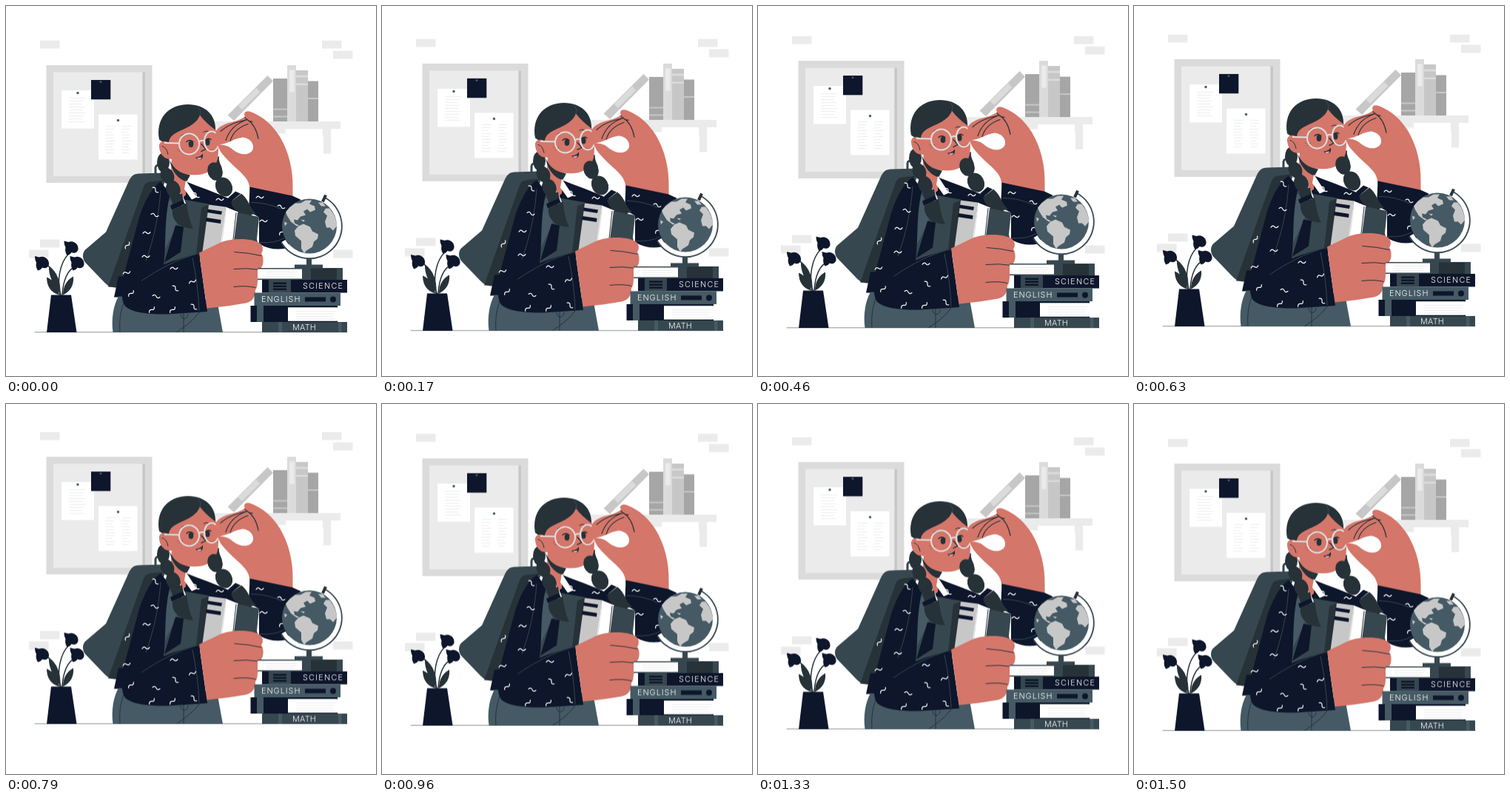
An HTML page that plays this animation: 500 by 500 pixels, repeating every 1540 ms.

```html
<!DOCTYPE html>
<html lang="en">
<head>
<meta charset="utf-8">
<title>Student with books</title>
<style>
html, body { margin: 0; width: 100%; height: 100%; overflow: hidden; background: #fff; }
svg { display: block; width: 100vw; height: 100vh; }
.navy { fill: #0d162b } .coal { fill: #263238 } .slate { fill: #37474f } .steel { fill: #455a64 }
.g1 { fill: #ebebeb } .g2 { fill: #dbdbdb } .g3 { fill: #c7c7c7 } .g4 { fill: #a6a6a6 }
.w { fill: #fff } .skin { fill: #d4766a }
.line { fill: none; stroke: #263238; stroke-width: 1; stroke-linecap: round; stroke-linejoin: round }
.soft { fill: none; stroke: #37474f; stroke-width: 1 }
.rule { fill: none; stroke: #e6e6e6; stroke-width: .7 }
.mark { fill: none; stroke: #fff; stroke-width: 1.2; stroke-linecap: round }
.rim { fill: none; stroke: #e0e0e0; stroke-width: 2 }
text { font: 300 10.8px Inter, sans-serif; fill: #fff }
</style>
</head>
<body>
<svg viewBox="0 0 500 500">
<g id="scene">
  <g id="bricks" class="g1"></g>

  <!-- notice board -->
  <rect class="g2" x="54.500" y="80.500" width="143" height="159"/>
  <rect class="g1" x="64" y="90" width="120.500" height="140.500"/>
  <rect class="g3" x="184.500" y="90" width="3.500" height="140.500"/>
  <rect class="w" x="75" y="114.500" width="44" height="51.500"/>
  <rect class="w" x="125" y="147" width="52.500" height="61"/>
  <rect class="navy" x="115" y="100.500" width="26.300" height="26.300"/>
  <path id="notes" class="rule"/>
  <g class="steel"><circle cx="97" cy="118" r="1.700"/><circle cx="151.500" cy="155" r="1.700"/><circle cx="128" cy="103" r="1.500"/></g>

  <!-- shelf -->
  <path class="g1" d="M281 156.500H452V166.500H439V200H429V177H428V166.500H378V173H362V166.500H281Z"/>
  <path class="g4" d="M361 98.500H380V156.500H361ZM408 102H422V156.500H408Z"/>
  <path class="g2" d="M380 80.500H392V156.500H380Z"/>
  <path class="g3" d="M392 87.500H408V156.500H392ZM361 139H380V141H361ZM361 149H380V151H361ZM408 124.500H422V126.500H408ZM353.500 94.500 361 102 308 155.500 299.500 148Z"/>
  <path class="g1" d="M383 87H389.500V117H383Z"/>
  <path class="g2" d="M392 94H408V97H392ZM392 105H408V107.500H392ZM338 111 343.500 116.500 319 140.500 313.500 135Z"/>

  <path class="line" style="stroke-width:.7" d="M39 441.500H461"/>

  <!-- plant -->
  <path class="line" style="stroke-width:1.500" d="M74 391C68 372 73 347 85 335M73 391C73 374 63 352 53 350M76 391C77 372 83 356 95 352"/>
  <path class="coal" d="M72 391C60 388 55 378 55 367C65 371 71 381 72 391ZM73 389C64 378 57 364 58 352C69 359 75 375 73 389ZM77 391C77 379 82 371 91 366C92 378 87 386 77 391Z"/>
  <g class="navy">
    <path id="bloom" d="M58 350C59 343 52 337 45 340L39 338.500C39 343 40 345 41 347C40 351 41 355 43 358C46 357 48 356 49 354C53 356 57 354 58 350Z"/>
    <use href="#bloom" transform="translate(39.500 -20.500)"/>
    <use href="#bloom" transform="translate(47.500 0)"/>
    <path d="M61 391H88L95.500 441.500H55Z"/>
  </g>

  <!-- backpack -->
  <path class="line" style="stroke-width:3;stroke:#37474f" d="M202 228V219Q203 214 210 216"/>
  <path class="slate" d="M212 226 180 227C172 227 169 231 166 237L135 306 107 330C103 334 103 342 107 347L133 374C138 379 142 381 149 381H166L214 240Z"/>
  <path class="coal" d="M212 236 195 238Q188 239 186 245L138 380 160 381Z"/>
  <path class="navy" d="M152 366H164V394H146Z"/>

  <!-- trousers -->
  <path class="steel" d="M152 393C145 405 142 424 144.500 441.500H293L286 403 262 395Z"/>
  <path class="line" d="M159 402C154 416 153 428 154 441M262 413C255 424 243 433 231 441M240 416V441M236 417C236 425 246 425 246 417"/>

  <!-- torso -->
  <path class="navy" d="M244 238C260 245 282 251 312 266L330 275 342 330 240 345 210 358 218 250Z"/>
  <path class="slate" d="M216 244 240 262 274 268 264 338 210 357Z"/>
  <path class="steel" d="M215 258 236 272 230 298 212 335Z"/>
  <path class="navy" d="M229 297 240 299 236 333 214 347Z"/>
  <path class="skin" d="M224 204 248 222 244 240 243 256 238 260C230 250 226 243 222 240Z"/>
  <path class="coal" d="M221 208C226 220 235 227 249 229L244 238C232 234 224 224 221 208Z"/>
  <path class="w" d="M227 244 239 257 244 270 239 275ZM243 236 258 259 251 262 241 248Z"/>
  <path class="navy" d="M209 238C197 246 186 266 179 290L160 361C156 382 155 398 161 406C169 415 196 417.500 218 417L272 413.500 261 334 226 345 213 350C217 320 213 290 222 254Z"/>
  <path class="soft" d="M183 372C205 357 230 343 260 335M252 341Q260 380 261 413M209 250C206 290 198 320 189 345"/>

  <!-- head -->
  <g class="coal">
    <ellipse cx="212.500" cy="212" rx="8.500" ry="13"/>
    <path d="M278 204H288C287 210 290 214 292 220L274 224Z"/>
  </g>
  <path class="skin" d="M219 166C218 192 221 206 231 219C238 227 248 230 261 228.500C274 227 283 220 286 207C288 194 287 178 283 166C276 149 262 140 240 150Z"/>
  <path class="coal" d="M207 181C202 153 219 133.500 246 133.500C269 133.500 284 148 283 168C274 161 267 155 262 148C257 162 240 166 228 173C221 177 219 184 220 190Z"/>
  <path class="line" style="stroke:#455a64;stroke-width:.7" d="M262 148Q265 142 259 137"/>
  <path class="skin" d="M225 189C217 180 206 182 207 191C208 202 215 209 225 207Z"/>
  <path class="line" d="M211 190Q217 191 219 201M237 176Q244 171 250 174M267 171Q271 168 275 171"/>
  <g class="coal"><ellipse cx="250" cy="187" rx="3.300" ry="4.500"/><ellipse cx="272.500" cy="184.500" rx="3" ry="4.500"/></g>
  <path class="line" style="stroke-width:1.400" d="M244 184Q248 180 253 184M269 182Q273 178 277 181M264 187 270 194 264 197"/>
  <path class="coal" d="M256 205Q262 205 266 200Q267 207 262 208Q258 208 256 205Z"/>
  <path d="M258 206Q262 205 264 205Q264 208 260 208Z" fill="#f0a0a8"/>
  <path class="line" style="stroke-width:.9;stroke:#7c2f2a;stroke-dasharray:.1 3" d="M232 194H240M234 197H240M273 195H280"/>
  <ellipse class="rim" cx="247.500" cy="187" rx="13.500" ry="14"/>
  <ellipse class="rim" cx="278" cy="183.500" rx="10" ry="13.500"/>
  <path class="rim" d="M214 185.500 234 186M261 184Q264 181 268 183"/>

  <!-- raised arm -->
  <path class="skin" fill-rule="evenodd" d="M284 169C287 164 295 160 303 158C311 156 319 153 323 150C320 144 325 141 332 144C347 150 360 161 370 177C382 197 388 221 387.500 246V261L329 250C331 234 316 225 303 212C294 203 289 197 287 191C284 184 282 176 284 169ZM288 188C297 188 301 190 307 195C317 203 331 203 334 193C335 185 329 179 320 178C309 179 302 186 288 188Z"/>
  <path class="line" style="stroke-width:1.200" d="M290 170C301 160 314 157 326 154C334 159 339 169 341 180M297 182C300 173 307 160 326 154M303 183C306 172 315 164 327 160M323 151Q326 156 333 157"/>
  <path class="navy" d="M329.500 245 387 257 398 262 392 310 378 328Q360 332 342 322V286L328 278Z"/>
  <path class="soft" d="M331 266Q352 266 372 275M343 320Q362 322 376 314"/>

  <g id="marks" class="mark"></g>

  <!-- braids -->
  <g class="coal">
    <ellipse cx="218" cy="230" rx="9" ry="11.500" transform="rotate(-25 218 230)"/>
    <ellipse cx="226" cy="248" rx="9.500" ry="12" transform="rotate(-20 226 248)"/>
    <path d="M222 257 238 254 241 268 226 272ZM225 276 244 267C246 280 248 292 253 301C238 302 223 292 225 276Z"/>
    <ellipse cx="282.500" cy="224" rx="10" ry="12.500" transform="rotate(-20 282.500 224)"/>
    <ellipse cx="294.500" cy="245" rx="11" ry="13.500" transform="rotate(-30 294.500 245)"/>
    <path d="M304 265 318 254C328 261 329 274 338 281C324 285 308 282 304 265Z"/>
  </g>
  <path class="navy" d="M222 270 238 263 242 268 224 276ZM300 260 310 251 317 254 304 265Z"/>

  <!-- carried books -->
  <path class="coal" d="M264 273 274 269 267 336 257 336Z"/>
  <path class="g3" d="M274 269 297 272 290 330 265 336Z"/>
  <path class="navy" d="M272.500 275 292 278 291 282.500 272 279.500ZM271 286.500 290.500 289.500 290 294.500 270 291.500Z"/>
  <path class="w" d="M297 272 314 279 308 325 289 330Z"/>
  <path class="soft" style="stroke:#dbdbdb" d="M297 278 291 325"/>
  <path class="slate" d="M313 279.500 342 285.500 338 325H307Z"/>
  <path class="line" d="M311 280 306 325"/>
  <path class="skin" d="M261 334 288 321C304 314 329 314 341 320C348 323 348 331 345 335C349 340 348 351 345 354C345 360 343 367 340 370C340 377 339 382 337 384C337 394 333 400 324 402C308 405 290 407 271.500 409Z"/>
  <path class="line" d="M309 333Q328 334 345 338M308 356Q325 354 343 357M308 380Q325 378 337 381"/>

  <!-- globe -->
  <path d="M430 263A40.300 40.300 0 1 1 375 318" fill="none" stroke="#fff" stroke-width="6"/>
  <path d="M432 260A43.900 43.900 0 1 1 372 320" fill="none" stroke="#37474f" stroke-width="1.800"/>
  <path d="M428 265 432 256" stroke="#263238" stroke-width="4" fill="none"/>
  <path class="slate" d="M406 341H413V350H428V355.500H390V350H406Z"/>
  <circle class="steel" cx="410" cy="298" r="37"/>
  <path class="g3" d="M383 273 391 267 398 267 405 263 413 263 410 268 417 271 418 276 411 279 407 275 402 278 405 283 398 285 394 290 389 289 390 294 396 297 393 298 385 292 380 284 378 279ZM395 298 402 295 411 299 414 305 422 309 421 315 416 319 414 326 406 331 403 335 399 328 399 318 391 311 390 304ZM437 274C443 280 447 290 447 298L442 304 438 300 433 300 431 292 434 284 429 279 432 274ZM422 266 428 266 432 271 426 271Z"/>
  <path class="g3" d="M398 289 404 290 402 292ZM376 292 380 294 377 298Z"/>

  <!-- book stack -->
  <path class="w" d="M340 355H400V370H340Z"/>
  <path class="slate" d="M340 354.500H455V370.500H340V369H400V356H340Z"/>
  <path class="coal" d="M412 355H447V370.500H412Z"/>
  <path class="navy" d="M346 370.500H461V388H346Z"/>
  <path class="slate" d="M355 370.500H385V388H355Z"/>
  <path class="navy" d="M361 374H379V376.500H361ZM361 378H379V380.500H361ZM361 382H379V384.500H361Z"/>
  <path class="steel" d="M335.500 388H452V405.500H335.500Z"/>
  <path class="navy" d="M404 394H432V400H404Z"/><circle class="navy" cx="442" cy="397" r="4"/>
  <path class="navy" d="M330.500 405.500H448V408H381V426H448V427.500H330.500Z"/>
  <path class="steel" d="M339 405.500H348V427.500H339Z"/>
  <path class="w" d="M381 408H447.500V426H381Z"/>
  <path class="slate" d="M346 427.500H461V441.500H346Z"/>
  <path class="steel" d="M368 427.500H373V441.500H368ZM449 427.500H453.500V441.500H449Z"/>
  <path id="pages" class="rule"/>
  <text x="401" y="383" letter-spacing="1.250">SCIENCE</text>
  <text x="345" y="400.500" letter-spacing="1">ENGLISH</text>
  <text x="387" y="438.300" letter-spacing=".3">MATH</text>
</g>
</svg>
<script>
const $ = id => document.getElementById(id);
const rows = (x, y, w, n, gap) =>
  Array.from({ length: n }, (_, i) => `M${x} ${y + i * gap}h${w - (i * 7) % 5}`).join('');

$('bricks').innerHTML = [[46, 47], [427, 47], [442, 61], [46, 316], [31, 330], [442, 330]]
  .map(([x, y]) => `<rect x="${x}" y="${y}" width="26.500" height="11"/>`).join('');

$('notes').setAttribute('d',
  rows(85, 125, 22, 9, 4) + rows(135, 163, 13, 10, 4) + rows(157, 163, 12, 10, 4));
$('pages').setAttribute('d', rows(352, 360, 42, 3, 3) + rows(392, 413, 54, 4, 3.5));

// x, y, angle of each squiggle on the jacket
const marks = [
  [202, 249, 50], [201, 283, 20], [190, 307, 0], [164, 324, -50], [163, 361, -10],
  [189, 339, 0], [169, 389, -40], [203, 393, 20], [227, 355, 0], [229, 382, 50],
  [252, 373, -20], [254, 407, 50], [197, 411, -40], [225, 411, -40],
  [257, 256, 45], [289, 262, 0], [343, 259, 0], [372, 272, 25], [348, 291, 0], [373, 306, -40]
];
$('marks').innerHTML = marks.map(([x, y, a]) =>
  `<path transform="translate(${x} ${y}) rotate(${a})" d="M-5 .8C-3-2.200-1.500-1.400 0 0S3 2.200 5-.8"/>`).join('');

// The whole scene floats up and down at 24 steps a second.
$('scene').animate(
  { transform: ['translateY(0px)', 'translateY(-10px)', 'translateY(0px)'] },
  { duration: 1540, delay: -3, iterations: Infinity, easing: 'steps(37, start)' }
);
</script>
</body>
</html>
```
